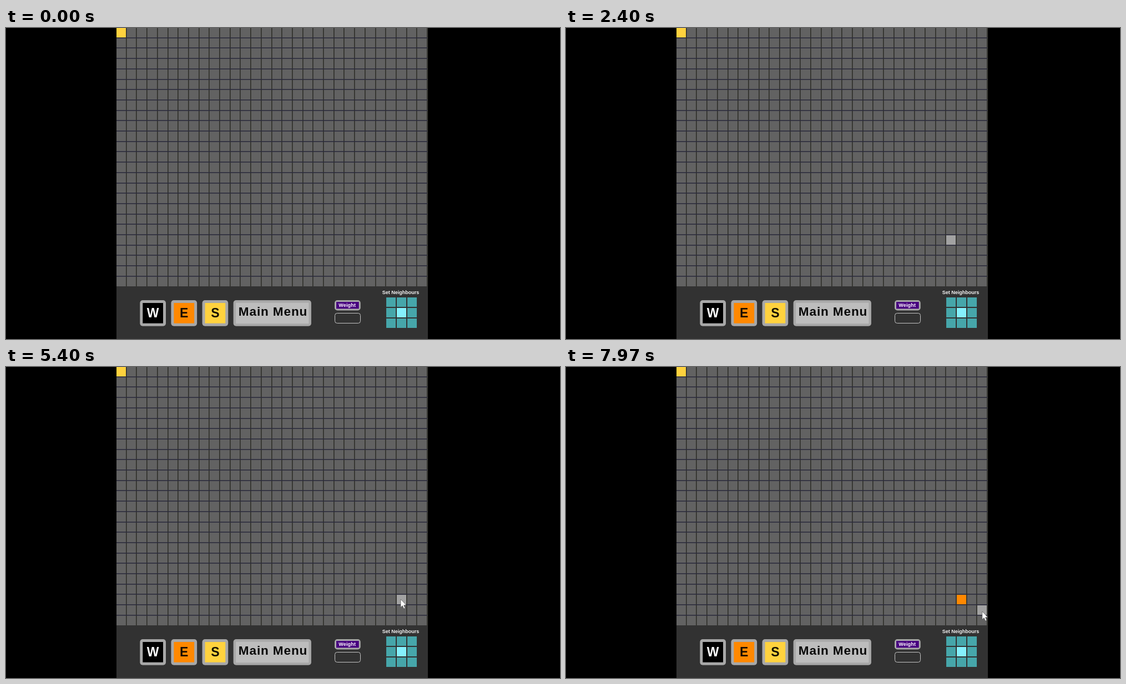
These frames come from a looping animation (998 by 561 pixels, 8 s). An HTML page with a canvas:

```html
<!DOCTYPE html>
<html lang="en">
<head>
<meta charset="utf-8">
<title>Grid editor</title>
<style>
  html, body { margin: 0; width: 100%; height: 100%; overflow: hidden; background: #000; }
  canvas { display: block; }
</style>
</head>
<body>
<canvas id="stage" width="998" height="561"></canvas>
<script>
const ctx = document.getElementById('stage').getContext('2d');
const LOOP = 8000, LEFT = 199, WIDTH = 561, PITCH = 18.7, PANEL_TOP = 466;
const ORANGE = '#ff8800', YELLOW = '#ffd23e', SILVER = '#a8a8a8';
const CURSOR_SHOWN = 2600, FIRST_CLICK = 6500, SECOND_CLICK = 7300;
const arrow = new Path2D('M0 0V14.5L3.3 11.5 5.7 17 8 16 5.7 10.7 10 10.5Z');

// Where the pointer turns or rests; it eases between these
const path = [
  { t: 0, x: 260, y: 549 },
  { t: 1000, x: 320, y: 514 },
  { t: 1600, x: 320, y: 514 },
  { t: 2400, x: 694, y: 382 },
  { t: 3900, x: 676, y: 422 },
  { t: 5400, x: 711, y: 419 },
  { t: FIRST_CLICK, x: 731, y: 441 },
  { t: 6870, x: 699, y: 443 },
  { t: SECOND_CLICK, x: 711, y: 422 },
  { t: LOOP, x: 750, y: 441 }
];

const gridX = col => Math.round(LEFT + col * PITCH);
const gridY = row => Math.round(row * PITCH);

function pointerAt(t) {
  const i = path.findIndex(p => p.t > t), a = path[i - 1], b = path[i];
  const u = (t - a.t) / (b.t - a.t), ease = u * u * (3 - 2 * u);
  return { x: a.x + (b.x - a.x) * ease, y: a.y + (b.y - a.y) * ease };
}

function rect(x, y, w, h, color) {
  ctx.fillStyle = color;
  ctx.fillRect(x, y, w, h);
}

function text(str, x, y, size, color, spacing = 0) {
  ctx.font = `bold ${size}px "Liberation Sans", Arial, sans-serif`;
  ctx.letterSpacing = spacing + 'px';
  ctx.textAlign = 'center';
  ctx.fillStyle = color;
  ctx.fillText(str, x, y);
}

function cell(col, row, color) {
  rect(gridX(col), gridY(row), 17, 17, color);
}

function button(x, y, w, h, border, fill) {
  ctx.fillStyle = SILVER;
  ctx.beginPath();
  ctx.roundRect(x, y, w, h, 5);
  ctx.fill();
  rect(x + border, y + border, w - 2 * border, h - 2 * border, fill);
}

function drawGrid() {
  rect(LEFT, 0, WIDTH, PANEL_TOP, '#626262');
  for (let col = 1; col <= 30; col++) rect(gridX(col) - 2, 0, 1.6, PANEL_TOP, '#2e2e28');
  for (let row = 1; row < 25; row++) rect(LEFT, gridY(row) - 2, WIDTH - 1, 1.6, '#2b2b3c');
}

function drawPanel(hoverE) {
  rect(LEFT, PANEL_TOP, WIDTH, 95, '#323232');

  const keys = [['W', '#000', '#fff'], ['E', ORANGE, hoverE ? '#fff' : '#180c00'], ['S', YELLOW, '#141000']];
  keys.forEach(([letter, fill, color], i) => {
    const x = 241.3 + i * 3 * PITCH;
    button(x, 491, 46.7, 46.7, 5, fill);
    text(letter, x + 23.3, 522, 23, color);
  });

  button(409.6, 491, 140.3, 46.7, 4.5, '#bdbdbd');
  text('Main Menu', 481, 519, 22.5, '#080808', 0.9);
  button(592, 491, 46.7, 18.4, 3, '#480080');
  text('Weight', 614.7, 503, 9, '#fff', 0.2);

  ctx.strokeStyle = '#c4c4c4';
  ctx.lineWidth = 1;
  ctx.beginPath();
  ctx.roundRect(592.5, 514.5, 46, 18, 4);
  ctx.stroke();

  text('Set Neighbours', 711, 480, 9, '#f4f4f4');
  for (let i = 0; i < 9; i++)
    cell(26 + i % 3, 26 + Math.floor(i / 3), i === 4 ? '#86f0fc' : '#46a6aa');
}

function drawCursor({ x, y }) {
  ctx.save();
  ctx.translate(x, y);
  ctx.fillStyle = '#fff';
  ctx.fill(arrow);
  ctx.strokeStyle = '#444';
  ctx.lineWidth = 0.6;
  ctx.stroke(arrow);
  ctx.restore();
}

function draw(t) {
  const mouse = pointerAt(t);
  const hoverE = mouse.x > 297 && mouse.x < 344 && mouse.y > 491 && mouse.y < 538;
  rect(0, 0, 998, 561, '#000');
  drawGrid();
  cell(0, 0, YELLOW);
  if (mouse.y < PANEL_TOP)
    cell(Math.floor((mouse.x - LEFT) / PITCH), Math.floor(mouse.y / PITCH), '#a2a2a2');
  if (t >= SECOND_CLICK) cell(27, 22, ORANGE);
  else if (t >= FIRST_CLICK) cell(28, 23, ORANGE);
  drawPanel(hoverE);
  if (t >= CURSOR_SHOWN) drawCursor(mouse);
}

const start = performance.now();
function tick() {
  draw((performance.now() - start) % LOOP);
  requestAnimationFrame(tick);
}
tick();
</script>
</body>
</html>
```
